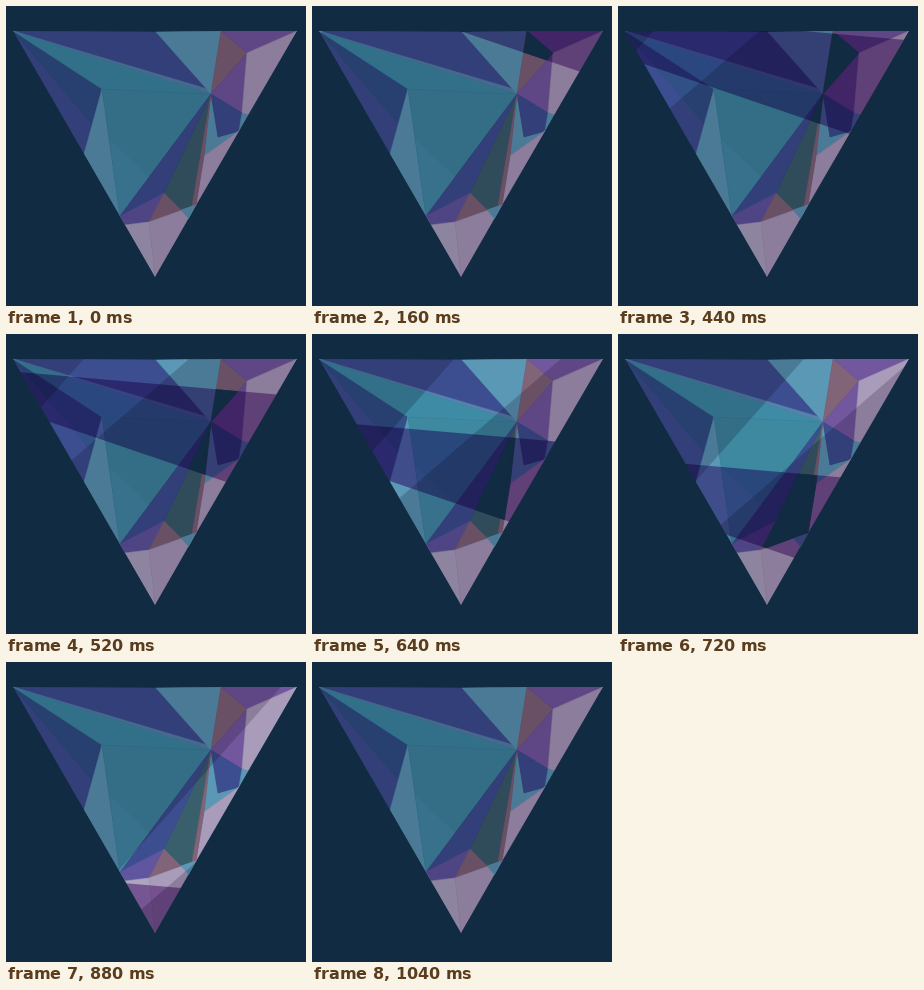
Recreate the animation shown at these times as an HTML page with a canvas. Size 300x300 px, loop 1080 ms.

```html
<!DOCTYPE html>
<html lang="en">
<head>
<meta charset="utf-8">
<title>Faceted triangle</title>
<style>
  html, body { margin: 0; width: 100%; height: 100%; overflow: hidden; background: #112b42; }
  canvas { display: block; width: 300px; height: 300px; }
</style>
</head>
<body>
<canvas id="stage" width="300" height="300"></canvas>
<script>
const ctx = document.getElementById('stage').getContext('2d');
const LOOP = 1080, STEP = 40, BACK = '#112b42';
const SHADE = 'rgb(175,132,196)', GLOW = 'rgb(45,50,42)';

const tone = {
  navy: '#323f78', blue: '#28406f', steel: '#4b7a97', teal: '#32708a',
  core: '#336d86', crease: '#38718b', strip: '#46698f', mauve: '#8b7d9b',
  pale: '#8d859f', purple: '#5f4684', plum: '#4f4585', maroon: '#6a5064', slate: '#304c5a'
};
const gaps = ['maroon', 'slate']; // open to the background when shaded

const corner = {
  a: [7, 25], b: [291, 25], c: [149, 271],
  d: [150, 26], e: [215, 25], f: [241, 47], g: [205, 88],
  h: [96, 83], i: [78, 148], j: [114, 210], k: [119, 219],
  l: [143, 216], m: [158, 187], n: [190, 199], o: [183, 213],
  p: [175, 204], q: [242, 109], r: [236, 107], s: [233, 125],
  t: [212, 131], u: [198, 150], v: [186, 200], w: [86, 118],
  x: [205, 84], y: [104, 134], z: [144, 172]
};

// Each facet is a tone and its corners
const facets = `navy adg, navy ahi, blue ahw, teal agh, strip axg, steel hjki, core hgj,
  crease yzj, steel deg, maroon efg, purple ebf, purple frg, mauve fbqr, steel gtsu,
  navy grst, steel rqs, mauve snu, slate gvpm, maroon gunv, navy gmj, plum mlj,
  maroon mpl, plum jlk, pale klc, mauve lnc, steel pno`
  .split(',').map(item => {
    const [name, letters] = item.trim().split(' ');
    return { name, path: [...letters].map(id => corner[id]) };
  });

const outline = [corner.a, corner.b, corner.c];

// Position of an edge as a polynomial of time, counted from mid-loop
function sweep(t, ...terms) {
  return terms.reduceRight((sum, term) => sum * (t - 520) + term, 0);
}

function trace(path) {
  ctx.beginPath();
  for (const [x, y] of path) ctx.lineTo(x, y);
  ctx.closePath();
}

function within(path, draw) {
  ctx.save();
  trace(path);
  ctx.clip();
  draw();
  ctx.restore();
}

function blend(path, mode, colour) {
  ctx.globalCompositeOperation = mode;
  ctx.fillStyle = colour;
  trace(path);
  ctx.fill();
  ctx.globalCompositeOperation = 'source-over';
}

function paint(list, colourOf) {
  ctx.lineWidth = 0.6;
  ctx.lineJoin = 'round';
  for (const { name, path } of list) {
    trace(path);
    ctx.fillStyle = ctx.strokeStyle = colourOf(name);
    ctx.fill();
    ctx.stroke();
  }
}

function shadeArea(t) {
  const front = sweep(t, 124, 0.3286, 4.6e-4, 8.5e-7);
  const back = sweep(t, 50, 0.375, 3e-4);
  return [[0, back - 13], [300, back + 13], [300, front + 51], [0, front - 51]];
}

function glowArea(t) {
  const front = sweep(t, 212, 0.53, 1.5e-4);
  const back = sweep(t, 100, 0.53, 5e-5);
  return [[back, 0], [front, 0], [front - 348, 300], [back - 266, 300]];
}

function render(t) {
  const shade = shadeArea(t);
  ctx.fillStyle = BACK;
  ctx.fillRect(0, 0, 300, 300);
  within(outline, () => {
    paint(facets, name => tone[name]);
    blend(shade, 'multiply', SHADE);
    within(shade, () => paint(facets.filter(({ name }) => gaps.includes(name)), () => BACK));
    blend(glowArea(t), 'color-dodge', GLOW);
  });
}

const start = performance.now();
function tick() {
  const t = (performance.now() - start) % LOOP;
  render(Math.floor(t / STEP) * STEP);
  requestAnimationFrame(tick);
}
tick();
</script>
</body>
</html>
```
